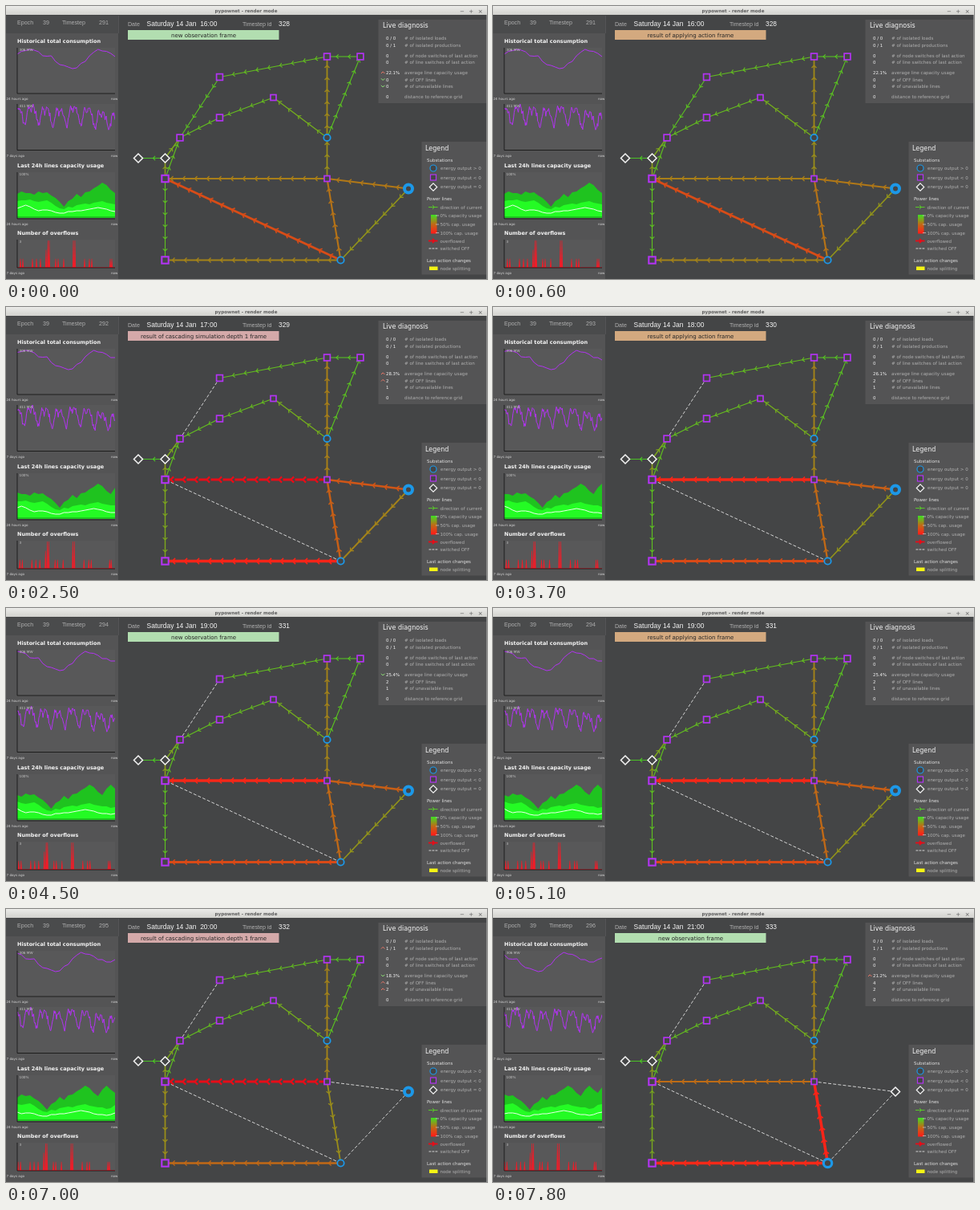
An HTML page with a canvas for the animation above (8000 ms loop, 600 px wide and 340 px high).

```html
<!DOCTYPE html>
<html lang="en">
<head>
<meta charset="utf-8">
<title>pypownet - render mode</title>
<style>
html, body { margin: 0; height: 100%; overflow: hidden; background: #444546; }
canvas { display: block; }
</style>
</head>
<body>
<canvas id="stage" width="600" height="340"></canvas>
<script>
const ctx = document.getElementById('stage').getContext('2d');
const LOOP = 8000, BG = '#444546', PANEL = '#545455', GRAY = '#b0b0b0', WHITE = '#f4f4f4';
const PURPLE = '#b233f2', BLUE = '#1c98e8', RED = '#e80c18', GREEN = '#58c828';
const SANS = '"DejaVu Sans", sans-serif', NARROW = '"Liberation Sans", sans-serif';

const nodes = {
  a: [400.5, 63], b: [442, 63], c: [266.5, 88.5], d: [333.5, 114], e: [266.5, 139],
  f: [217, 164], g: [400.5, 164], h: [198.5, 189.5], i: [165, 189.5], j: [198.5, 215],
  k: [400.5, 215], l: [502, 227.5], m: [417.5, 316.5], n: [198.5, 316.5]
};

// Line usage: 0 = off, above 1 = overflowed, negative = reversed current.
const normal = {
  lm: .33, lk: .45, mn: .4, mj: .7, mk: .47, jn: .13, kj: .42, gd: .22, gb: .12, ga: .38,
  ef: .15, cf: .12, de: .16, ba: .1, ac: .15, jh: .3, hi: .06, hf: .25, jf: .14, kg: .36
};
const tripped = { ...normal, mj: 0, kj: .96, lk: .54, mk: .52, mn: .53, jn: -.17 };
const cascaded = { ...tripped, cf: 0, kj: 1.1, mn: .95, mk: .58, lk: .64, lm: .4, jn: .25, ga: .42, kg: .42 };
const reduced = { ...cascaded, kj: .93, mn: .71, mk: .52, lk: .58, lm: .33, jn: .13, ga: .4, kg: .4 };
const eased = { ...reduced, kj: .92, mn: .68, mk: .48, lm: .31 };
const islanded = { ...eased, kj: 1.1, lk: 0, lm: 0, mk: -.36, mn: .52, jn: .36 };
const slackLost = { ...islanded, kj: .5, mk: .95, mn: .92, jn: -.24 };

const banners = {
  observe: ['new observation frame', '#b2deb0'],
  act: ['result of applying action frame', '#d3a97f'],
  cascade: ['result of cascading simulation depth 1 frame', '#d4a9a9']
};

// start, hour, banner, grid, usage %, off, unavailable, isolated, trends (isolated, usage, off, unavailable)
const scenes = [
  [0, 0, 'observe', normal, '22.1', 0, 0, 0, ' +--'],
  [500, 0, 'act', normal, '22.1', 0, 0, 0, '    '],
  [1200, 1, 'observe', tripped, '24.8', 1, 1, 0, ' +++'],
  [1800, 1, 'act', tripped, '24.8', 1, 1, 0, '    '],
  [2300, 1, 'cascade', cascaded, '28.3', 2, 1, 0, ' ++ '],
  [3200, 2, 'observe', reduced, '26.1', 2, 1, 0, ' -  '],
  [3700, 2, 'act', reduced, '26.1', 2, 1, 0, '    '],
  [4500, 3, 'observe', reduced, '25.4', 2, 1, 0, ' -  '],
  [5000, 3, 'act', reduced, '25.4', 2, 1, 0, '    '],
  [5800, 4, 'observe', eased, '24.3', 2, 0, 0, ' - -'],
  [6300, 4, 'act', eased, '24.3', 2, 0, 0, '    '],
  [6800, 4, 'cascade', islanded, '18.3', 4, 2, 1, '+-++'],
  [7700, 5, 'observe', slackLost, '21.2', 4, 2, 1, ' +  ']
];

const daily = [60, 56.5, 55.5, 54, 55, 57, 62, 62.5, 62, 69, 73, 74, 76, 78, 77, 71.5, 69, 62, 57.5, 54, 56, 56.5, 59, 63, 63, 66, 66, 63, 61];
const maxUsage = [234, 231, 233, 233, 235, 231, 233, 232, 236, 239, 244, 250, 243, 240, 234, 238, 232, 231, 227, 224, 220, 223, 229, 233, 225, 220, 225, 229, 222];
const highUsage = [243, 242, 242, 241, 243, 244, 243, 242, 245, 249, 252, 253, 250, 251, 248, 247, 246, 247, 245, 244, 243, 245, 246, 247, 247, 249, 248, 244, 243];
const median = [252, 250, 248, 250, 253, 255, 254, 254, 255, 257, 258, 258, 256, 256, 255, 255, 254, 253, 252, 251, 252, 253, 255, 256, 256, 257, 256, 254, 253];
const dayLift = [0, -2, 0, 2, -1, 1, 5, 7];
const overflows = [[18, 1], [21, 1], [33, 1], [38, 1], [43, 1], [50, 2], [52.3, 3], [54, 3], [62, 1], [65, 1], [72, 1], [84, 3], [86, 3], [98, 1], [104, 1], [107, 1], [130, 1], [132, 1]];

const noise = n => { const v = Math.sin(n * 127.1) * 43758.5; return v - Math.floor(v) - .5; };

function text(str, x, y, size, color = GRAY, align = 'left', weight = '', family = SANS) {
  ctx.font = `${weight} ${size}px ${family}`;
  ctx.textAlign = align;
  ctx.fillStyle = color;
  ctx.fillText(str, x, y);
}

const narrow = (str, x, y, size = 7.1, color = GRAY) => text(str, x, y, size, color, 'left', '', NARROW);

function box(x, y, w, h, color) {
  ctx.fillStyle = color;
  ctx.fillRect(x, y, w, h);
}

function path(points, color, width = 1, dash = []) {
  ctx.beginPath();
  points.forEach(p => ctx.lineTo(...p));
  ctx.setLineDash(dash);
  ctx.lineWidth = width;
  ctx.strokeStyle = color;
  ctx.stroke();
  ctx.setLineDash([]);
}

function area(points, floor, color) {
  ctx.beginPath();
  ctx.moveTo(points[0][0], floor);
  points.forEach(p => ctx.lineTo(...p));
  ctx.lineTo(points[points.length - 1][0], floor);
  ctx.fillStyle = color;
  ctx.fill();
}

function usageColor(u) {
  const stops = [[60, 225, 35], [190, 108, 22], [255, 28, 24]];
  const i = u < .5 ? 0 : 1, f = Math.min(1, u * 2 - i);
  return `rgb(${stops[i].map((v, n) => v + (stops[i + 1][n] - v) * f)})`;
}

function chevron(x, y, angle, size, color, width) {
  ctx.save();
  ctx.translate(x, y);
  ctx.rotate(angle);
  path([[-size, -size], [0, 0], [-size, size]], color, width);
  ctx.restore();
}

function powerLine(from, to, usage) {
  if (!usage) return path([from, to], '#d2d2d2', 1, [4, 2.2]);
  if (usage < 0) return powerLine(to, from, -usage);
  const over = usage > 1, dx = to[0] - from[0], dy = to[1] - from[1];
  const length = Math.hypot(dx, dy), angle = Math.atan2(dy, dx);
  const color = over ? RED : usageColor(usage), step = 15;
  path([from, to], color, over ? 3.2 : .7 + 3 * usage, over ? [10, 5] : []);
  for (let s = step; s < length - 4; s += step)
    chevron(from[0] + dx * s / length, from[1] + dy * s / length, angle,
      over ? 3.6 : 2.6 + usage, color, over ? 2.2 : 1 + .7 * usage);
}

function square([x, y], half, width) {
  box(x - half, y - half, half * 2, half * 2, BG);
  ctx.lineWidth = width;
  ctx.strokeStyle = PURPLE;
  ctx.strokeRect(x - half, y - half, half * 2, half * 2);
}

function circle([x, y], r, width) {
  ctx.beginPath();
  ctx.arc(x, y, r, 0, 7);
  ctx.fillStyle = BG;
  ctx.fill();
  ctx.lineWidth = width;
  ctx.strokeStyle = BLUE;
  ctx.stroke();
}

function diamond([x, y], r, width = 1.5) {
  ctx.beginPath();
  [[0, -r], [r, 0], [0, r], [-r, 0]].forEach(([dx, dy]) => ctx.lineTo(x + dx, y + dy));
  ctx.closePath();
  ctx.fillStyle = BG;
  ctx.fill();
  ctx.lineWidth = width;
  ctx.strokeStyle = WHITE;
  ctx.stroke();
}

function drawGrid(grid) {
  for (const [key, usage] of Object.entries(grid)) powerLine(nodes[key[0]], nodes[key[1]], usage);
  for (const key of 'abcdefjkn') {
    const heavy = key === 'j' || key === 'n';
    square(nodes[key], heavy ? 4.2 : key === 'd' || key === 'k' ? 3.5 : 3.9, heavy ? 2.1 : 1.7);
  }
  diamond(nodes.h, 5.5);
  diamond(nodes.i, 5.5);
  circle(nodes.g, 4.2, 1.8);
  const lost = grid === slackLost;
  circle(nodes.m, lost ? 5.2 : 4.2, lost ? 3.2 : 1.8);
  if (lost) diamond(nodes.l, 5.5);
  else circle(nodes.l, 5, 4);
}

function chart(top, bottom, label, span, draw) {
  box(14, top, 122, bottom - top, '#585859');
  ctx.save();
  ctx.beginPath();
  ctx.rect(14, top, 122, bottom - top);
  ctx.clip();
  draw();
  ctx.restore();
  path([[14, top], [14, bottom], [136, bottom]], '#101010', .8);
  text(label, 16.5, top + 4.2, 4.2, '#c8c8c8');
  text(span, .5, bottom + 8, 4.1, '#d8d8d8');
  text('now', 131, bottom + 8, 4.1, '#d8d8d8');
}

function drawHistory(hour) {
  const series = values => values.slice(hour, hour + 24).map((y, i) => [14 + i * 122 / 23, y]);
  const title = (str, y) => text(str, 14, y, 6.5, WHITE, 'left', 'bold');
  box(0, 12, 140, 328, PANEL);
  box(0, 12, 140, 22, '#4a4b4c');
  box(140, 12, .6, 22, '#606061');
  narrow('Epoch', 14, 22.5);
  narrow('39', 46, 22.5);
  narrow('Timestep', 70, 22.5);
  narrow(291 + hour, 116, 22.5);

  title('Historical total consumption', 46);
  chart(52, 109, '306 MW', '24 hours ago', () => path(series(daily), PURPLE));

  const week = Array.from({ length: 168 }, (_, i) => {
    const h = i + hour, day = Math.floor(h / 24), f = h % 24 / 24;
    const lift = dayLift[day] * (1 - f) + dayLift[Math.min(7, day + 1)] * f;
    return [14 + i * 122 / 167, 126 + (daily[h % 24] - 54) * .95 + lift + noise(h) * 6];
  });
  chart(122, 179.5, '411 MW', '7 days ago', () => path(week, PURPLE));

  title('Last 24h lines capacity usage', 201);
  chart(207, 265, '100%', '24 hours ago', () => {
    area(series(maxUsage), 264, '#1fc31f');
    area(series(highUsage), 262, '#24fb24');
    path(series(median), '#e8ffe8');
  });

  title('Number of overflows', 285);
  chart(291, 326, '3', '7 days ago', () => {
    for (const [x, level] of overflows) {
      const px = x - hour * .73, top = 326 - level * 11.3;
      area([[px - 1.1, 326], [px - .3, top], [px + .3, top], [px + 1.1, 326]], 326, '#f01c28');
    }
    path([[14, 325.5], [136, 325.5]], '#e01c28', .7);
  });
}

function drawDiagnosis(usage, off, unavailable, isolated, trends) {
  box(464.5, 17, 135.5, 104, PANEL);
  text('Live diagnosis', 470, 27, 8, WHITE);
  [
    [42, '0 / 0', '# of isolated loads'],
    [50.5, isolated + ' / 1', '# of isolated productions', trends[0]],
    [63.5, 0, '# of node switches of last action'],
    [72, 0, '# of line switches of last action'],
    [85, usage + '%', 'average line capacity usage', trends[1]],
    [93.5, off, '# of OFF lines', trends[2]],
    [102, unavailable, '# of unavailable lines', trends[3]],
    [115, 0, 'distance to reference grid']
  ].forEach(([y, value, label, trend]) => {
    text(value, 474, y, 5.4, WHITE);
    text(label, 497, y, 5.6);
    if (trend === '+') path([[468, y - 1], [470.2, y - 3.2], [472.4, y - 1]], '#f07868');
    if (trend === '-') path([[468, y - 3.2], [470.2, y - 1], [472.4, y - 3.2]], '#90e878');
  });
}

function drawLegend() {
  const heading = (str, y) => text(str, 525, y, 5.5, '#e0e0e0');
  const arrow = (y, color, width) => {
    path([[527, y], [538.5, y]], color, width);
    chevron(534.5, y, 0, 2.5, color, width);
  };
  box(518.5, 169, 81.5, 165.5, PANEL);
  text('Legend', 523, 180, 8, WHITE);
  heading('Substations', 194);
  circle([533, 202], 4, 1.2);
  square([533, 213.5], 3.5, 1.2);
  diamond([533, 225.5], 4.7, 1.2);
  ['>', '<', '='].forEach((sign, i) => text(`energy output ${sign} 0`, 542, 204 + i * 11.7, 5.5));

  heading('Power lines', 241.5);
  arrow(250.5, GREEN, 1);
  const ramp = ctx.createLinearGradient(0, 260, 0, 283);
  [0, .5, 1].forEach(u => ramp.addColorStop(u, usageColor(u)));
  box(530, 260, 7.5, 23.5, ramp);
  [261, 272, 282.5].forEach(y => path([[536, y], [540, y]], '#d2d2d2', .7));
  arrow(292.5, RED, 1.8);
  path([[527.5, 302], [538.5, 302]], '#d2d2d2', 1, [2.8, 1.2]);
  [['direction of current', 252.5], ['0% capacity usage', 263], ['50% cap. usage', 274],
    ['100% cap. usage', 284.5], ['overflowed', 294.5], ['switched OFF', 304]]
    .forEach(([label, y]) => text(label, 541.5, y, 5.5));

  heading('Last action changes', 319);
  box(528, 324.5, 10.5, 4.5, '#f4f414');
  text('node splitting', 541.5, 329, 5.5);
}

function drawWindow() {
  const bar = ctx.createLinearGradient(0, 0, 0, 11);
  bar.addColorStop(0, '#ebebe8');
  bar.addColorStop(1, '#d2d2ce');
  box(0, 0, 600, 11, bar);
  box(599.3, 11, .7, 329, '#a0a0a0');
  text('pypownet - render mode', 299.5, 8.2, 5.6, '#606060', 'center', 'bold');
  ['−', '+', '×'].forEach((sign, i) => text(sign, 569 + i * 11.3, 8.5, 7, '#606060', 'center'));
}

function drawFrame(time) {
  const [, hour, kind, grid, ...status] = scenes.filter(s => s[0] <= time).pop();
  const [label, color] = banners[kind];
  box(0, 0, 600, 340, BG);
  drawHistory(hour);

  narrow('Date', 152, 24.5);
  narrow(`Saturday 14 Jan  ${16 + hour}:00`, 175.5, 24.5, 8.5, WHITE);
  narrow('Timestep id', 295, 24.5);
  narrow(328 + hour, 340, 24.5, 8.4, WHITE);
  box(152, 30, 188.5, 12, color);
  text(label, 246.5, 38.6, 7, '#262626', 'center');

  drawGrid(grid);
  drawDiagnosis(...status);
  drawLegend();
  drawWindow();
}

function tick() {
  drawFrame(performance.now() % LOOP);
  requestAnimationFrame(tick);
}
tick();
</script>
</body>
</html>
```
